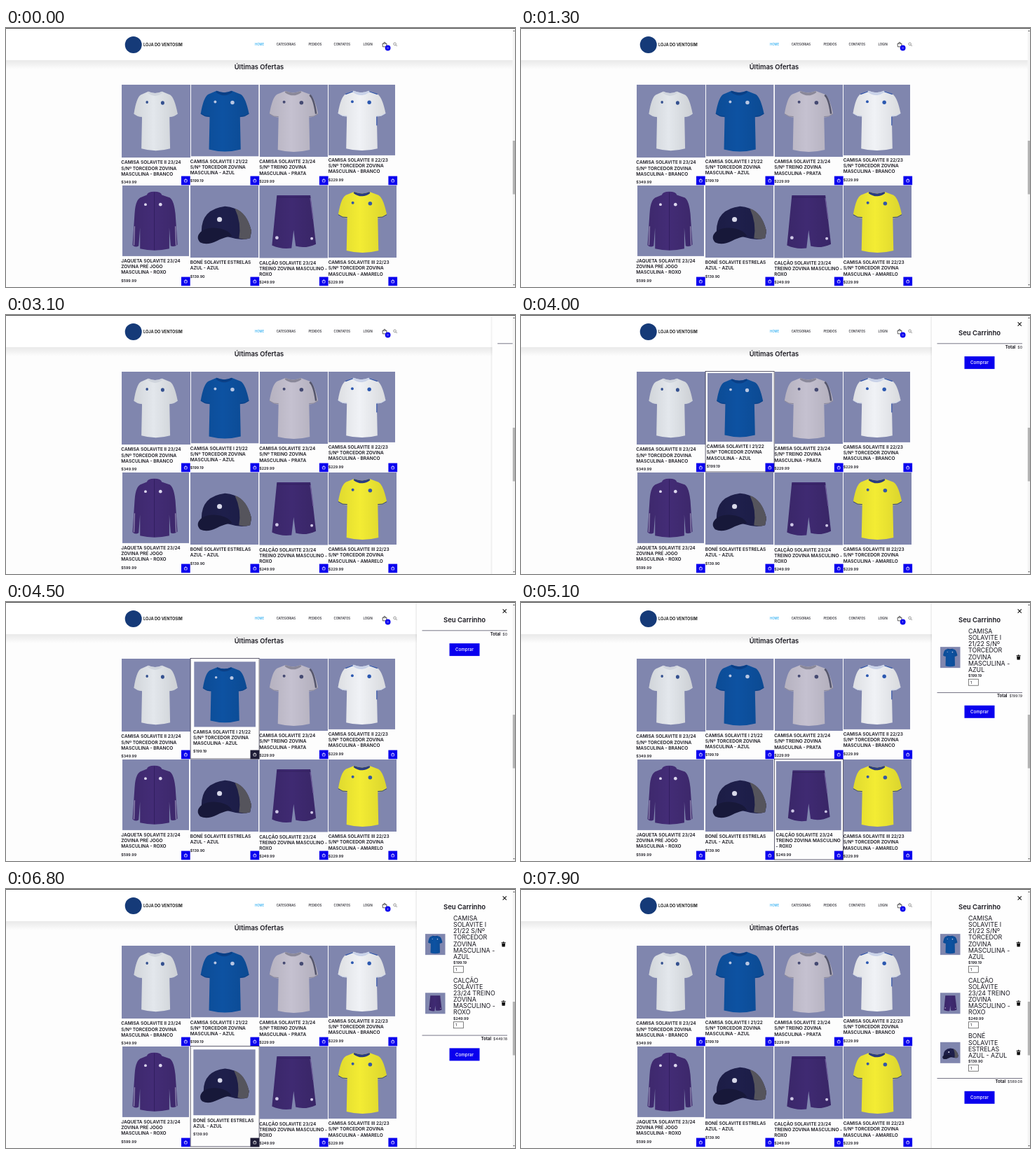
An HTML page that plays this animation: 726x370 px, repeating every 8000 ms.

```html
<!DOCTYPE html>
<html lang="pt">
<head>
<meta charset="utf-8">
<title>Loja</title>
<style>
html, body { margin: 0; width: 100%; height: 100%; overflow: hidden; background: #fdfdfd; }
svg { display: block; width: 726px; height: 370px; font-family: Inter, sans-serif; }
</style>
</head>
<body>
<svg id="stage" viewBox="0 0 726 370">
  <defs>
    <linearGradient id="shade"><stop stop-opacity=".08"/><stop offset=".45" stop-opacity="0"/><stop offset="1" stop-opacity=".1"/></linearGradient>
    <linearGradient id="drop" x2="0" y2="1"><stop stop-opacity=".08"/><stop offset="1" stop-opacity="0"/></linearGradient>
    <linearGradient id="side"><stop stop-opacity="0"/><stop offset="1" stop-opacity=".08"/></linearGradient>
  </defs>
  <g id="scene"></g>
</svg>
<script>
const LOOP = 8000, BLUE = '#0a00ee', INK = '#18171f', NIGHT = '#1e1c36';

const rect = (x, y, w, h, fill, extra = '') =>
  `<rect x="${x}" y="${y}" width="${w}" height="${h}" fill="${fill}" ${extra}/>`;
const path = (d, fill, extra = '') => `<path d="${d}" fill="${fill}" ${extra}/>`;
const line = (d, color, width) => path(d, 'none', `stroke="${color}" stroke-width="${width}"`);
const dot = (x, y, r, fill) => `<circle cx="${x}" cy="${y}" r="${r}" fill="${fill}"/>`;
const at = (x, y, body, sx = 1, sy = sx) => `<g transform="translate(${x} ${y}) scale(${sx} ${sy})">${body}</g>`;
// y is the middle of the capitals
const text = (x, y, size, str, weight = 600, fill = INK, extra = '') =>
  `<text x="${x}" y="${y + size * 0.36}" font-size="${size}" font-weight="${weight}" fill="${fill}" ${extra}>${str}</text>`;
const middle = 'text-anchor="middle"';

// Garments, drawn on a 98 x 104 tile
const shaded = (d, fill) => path(d, fill) + path(d, 'url(#shade)');
const TEE = 'M37 9Q48 14 59 9L72 14Q79 18 84 42Q78 47 71 47L72 94Q49 100 26 94L27 47Q20 47 14 42Q18 18 25 14Z';
const tee = (fill, trim, badge, extra = '') =>
  shaded(TEE, fill) + path('M37 9Q48 14 59 9L60 11Q48 20 36 11Z', trim) +
  line('M14 42Q20 47 27 46M84 42Q78 47 71 46', trim, 1) + extra +
  dot(35, 25, 2, badge) + dot(60, 26, 2.8, badge);
const JACKET = 'M36 14Q37 9 47 9Q57 9 58 14L70 18Q76 22 78 42L81 87Q76 91 71 89L69 62V93Q47 98 26 93V62L24 89Q19 92 15 88L18 42Q19 22 26 18Z';
const art = {
  white: at(5, 1, tee('#e3e7ec', '#d0d5dd', '#34508f'), 0.89, 0.96),
  blue: tee('#0d52a2', '#0a3f86', '#b9c6e2'),
  silver: tee('#c5c1d0', '#8a8899', '#454a72', line('M72 15Q78 20 81 42', '#55566c', 2.6)),
  away: tee('#f0f2f6', '#c9d2e8', '#2b58b0', line('M25 14L36 10M72 14L60 10M71 47V60', '#2c50a6', 1.2)),
  jacket: shaded(JACKET, '#432c76') + line('M47 10V95', '#33215f', 1) +
    line('M18 60L17 88M78 60L79 88', '#8f88b0', 1.4) + dot(34, 28, 2, '#ddd8ee') + dot(56, 28, 2.4, '#ddd8ee'),
  cap: shaded('M16 66Q16 34 50 30Q80 32 88 66L86 76Q74 80 58 75Z', '#1e1f4b') +
    path('M64 33Q82 39 88 66L86 76Q78 79 70 76Q74 54 64 33Z', '#55545c') +
    path('M11 73Q15 61 34 61Q54 62 60 73Q50 74 38 80Q24 87 14 82Q10 78 11 73Z', '#171839') + dot(42, 49, 3.6, '#d8d9ea'),
  shorts: shaded('M25 14H73L81 84Q66 91 52 87L49 64L46 90Q31 92 18 86Z', '#3f2a72') +
    line('M25 17H73', '#33215f', 1) + line('M73 18L77 48', '#6a5b97', 1.4) +
    dot(25, 75, 2.4, '#cfc8e6') + dot(75, 76, 2, '#cfc8e6'),
  yellow: tee('#f3ec33', '#2b3c80', '#3558a5')
};
const photo = (name, x, y, w, h) =>
  rect(x, y, w, h, '#8086ae') + at(x, y, art[name], w / 98, h / 104);

const card = (art, x, y, imgX, w, price, title) => ({ art, x, y, imgX, w, price, title });
const cards = [
  card('white', 164.3, 81, 165, 98, '349.99', 'CAMISA SOLAVITE II 23/24|S/Nº TORCEDOR ZOVINA|MASCULINA - BRANCO'),
  card('blue', 262.8, 81, 264, 96.3, '199.19', 'CAMISA SOLAVITE I 21/22|S/Nº TORCEDOR ZOVINA|MASCULINA - AZUL'),
  card('silver', 361.2, 81, 362, 97, '229.99', 'CAMISA SOLAVITE 23/24|S/Nº TREINO ZOVINA|MASCULINA - PRATA'),
  card('away', 459.7, 81, 460, 95, '229.99', 'CAMISA SOLAVITE II 22/23|S/Nº TORCEDOR ZOVINA|MASCULINA - BRANCO'),
  card('jacket', 164.3, 225, 166, 95, '599.99', 'JAQUETA SOLAVITE 23/24|ZOVINA PRÉ JOGO|MASCULINA - ROXO'),
  card('cap', 262.8, 225, 263, 97, '139.90', 'BONÉ SOLAVITE ESTRELAS|AZUL - AZUL'),
  card('shorts', 361.2, 225, 361.5, 97.5, '249.99', 'CALÇÃO SOLAVITE 23/24|TREINO ZOVINA MASCULINO -|ROXO'),
  card('yellow', 459.7, 225, 460, 97, '229.99', 'CAMISA SOLAVITE III 22/23|S/Nº TORCEDOR ZOVINA|MASCULINA - AMARELO')
];
// The shorts title rewraps as its card narrows
const shortsTitle = p => 'CALÇÃO SOLAVITE 23/24|' +
  (p < 0.7 ? 'TREINO ZOVINA MASCULINO|- ROXO' : 'TREINO ZOVINA|MASCULINO - ROXO');

const hovers = [
  { card: 1, from: 3900, to: 4900, button: [4250, 4900] },
  { card: 6, from: 4985, to: 6400, button: [5400, 6000] },
  { card: 5, from: 6400, to: 7350, button: [6650, 7350] }
];
const purchases = [
  { time: 4800, card: cards[1], title: 'CAMISA|SOLAVITE I|21/22 S/Nº|TORCEDOR|ZOVINA|MASCULINA -|AZUL' },
  { time: 5800, card: cards[6], title: 'CALÇÃO|SOLAVITE|23/24 TREINO|ZOVINA|MASCULINO -|ROXO' },
  { time: 7100, card: cards[5], title: 'BONÉ|SOLAVITE|ESTRELAS|AZUL - AZUL' }
];

// cubic-bezier(.25, .1, .25, 1)
function ease(x) {
  if (x <= 0) return 0;
  if (x >= 1) return 1;
  const bezier = (s, a, b) => 3 * s * (1 - s) ** 2 * a + 3 * s * s * (1 - s) * b + s ** 3;
  let lo = 0, hi = 1;
  for (let i = 0; i < 20; i++) {
    const mid = (lo + hi) / 2;
    if (bezier(mid, 0.25, 0.25) < x) lo = mid; else hi = mid;
  }
  return bezier(lo, 0.1, 1);
}

const bag = (color, width) =>
  line('M0 2H6L5.6 6.5H.4ZM1.6 2Q1.6 0 3 0Q4.4 0 4.4 2', color, width);
const trash = path('M0 1H2L2.4 0H3.8L4.2 1H6.2V2H0ZM.6 2.6H5.6L5.2 7.4H1Z', '#111');

function drawCard(c, i, t) {
  const hover = hovers.find(h => h.card === i && t >= h.from && t < h.to);
  const p = hover ? ease((t - hover.from) / 400) : 0;
  const inset = hover ? 0.4 + 3.9 * p : 0;
  const w = c.w - 2 * inset, h = w * 1.062;
  const x = c.x + inset, y = c.y + inset;
  const dark = hover && t >= hover.button[0] && t < hover.button[1];
  const lines = (hover && i === 6 ? shortsTitle(p) : c.title).split('|');
  const top = y + h + 7;
  return photo(c.art, c.imgX + inset, y, w, h) +
    lines.map((s, n) => text(x, top + n * 8.1, 6.5, s)).join('') +
    text(x, top + lines.length * 8.1 + 3.5, 5.3, '$' + c.price) +
    rect(c.x + 85.7, c.y + 130.6, 12.7, 12.7, dark ? NIGHT : BLUE) +
    at(c.x + 90, c.y + 134.6, bag('#fff', 1), 0.68) +
    (hover ? rect(c.x + 0.3, c.y - 0.6, 98, 143.6, 'none', `stroke="${NIGHT}" stroke-width=".7"`) : '');
}

const header = count =>
  rect(0, 46, 723, 13, 'url(#drop)') + rect(0, 0, 723, 46, '#fff') +
  dot(181.7, 24, 12, '#153a78') +
  text(196, 24, 5.6, 'LOJA DO VENTOSIM', 700, '#222') +
  [['HOME', 355], ['CATEGORIAS', 385.7], ['PEDIDOS', 431.5], ['CONTATOS', 467.5], ['LOGIN', 509.5]]
    .map(([s, x], i) => text(x, 23.2, 4.3, s, i ? 500 : 600, i ? INK : '#3fb4f2')).join('') +
  at(537, 20.3, bag('#333', 0.8)) + dot(544.6, 28.5, 3.9, BLUE) +
  text(544.6, 28.5, 4, count, 400, '#fff', middle) +
  '<circle cx="554.6" cy="22.8" r="1.8" fill="none" stroke="#555" stroke-width=".6"/>' +
  line('M556 24.2L557.8 26', '#555', 0.7);

function cartItem({ card, title }, y) {
  const lines = title.split('|'), height = 25 + 9.1 * lines.length;
  const mid = y + height / 2 - 2, end = y + 5 + 9.1 * lines.length;
  return {
    height,
    body: photo(card.art, 12, mid - 15, 28.5, 30) +
      lines.map((s, n) => text(52, y + 5.2 + n * 9.1, 8.8, s, 400)).join('') +
      text(52, end - 0.2, 5.3, '$' + card.price) +
      rect(52.3, end + 4.7, 14, 9, '#fff', 'stroke="#444" stroke-width=".7"') +
      text(55, end + 9.3, 5.4, '1', 400) + at(120.5, mid - 4, trash)
  };
}

function drawCart(items, slide) {
  let y = 36.8, body = '', total = 0;
  for (const item of items) {
    const row = cartItem(item, y);
    body += row.body;
    y += row.height;
    total += +item.card.price;
  }
  return at(586 + 726 * (1 - slide), 0,
    rect(-3, 1, 3, 369, 'url(#side)') + rect(0, 1, 140, 369, '#fefefe') +
    text(68, 25.5, 9.5, 'Seu Carrinho', 600, INK, middle) +
    line('M122.6 10.4L127.8 15.6M127.8 10.4L122.6 15.6', '#111', 1.1) + body +
    line(`M7.5 ${y + 4}H129`, NIGHT, 0.6) +
    text(129, y + 8.6, 6, `<tspan>Total</tspan><tspan dx="3" font-size="5.3" font-weight="400">$${+total.toFixed(2)}</tspan>`,
      700, INK, 'text-anchor="end"') +
    rect(46.5, y + 22.3, 43, 18, BLUE) +
    text(68, y + 31.3, 6.2, 'Comprar', 500, '#fff', middle));
}

const scrollbar = rect(722.6, 1, 3.4, 369, '#f4f4f4') + rect(722.8, 161, 3.2, 76.5, '#b4b4b4') +
  path('M723.3 5L724.5 3L725.7 5ZM723.3 366L724.5 368L725.7 366Z', '#666');

function scene(t) {
  const items = purchases.filter(p => t >= p.time);
  return rect(0, 0, 726, 370, '#fdfdfd') + header(items.length) +
    text(361, 55.3, 9.4, 'Últimas Ofertas', 600, INK, middle) +
    cards.map((c, i) => drawCard(c, i, t)).join('') +
    drawCart(items, ease((t - 2879) / 400)) + scrollbar + rect(0, 0, 726, 0.9, '#333');
}

const root = document.getElementById('scene');
let shown = '';
function frame() {
  const next = scene(performance.now() % LOOP);
  if (next !== shown) root.innerHTML = shown = next;
  requestAnimationFrame(frame);
}
frame();
</script>
</body>
</html>
```
